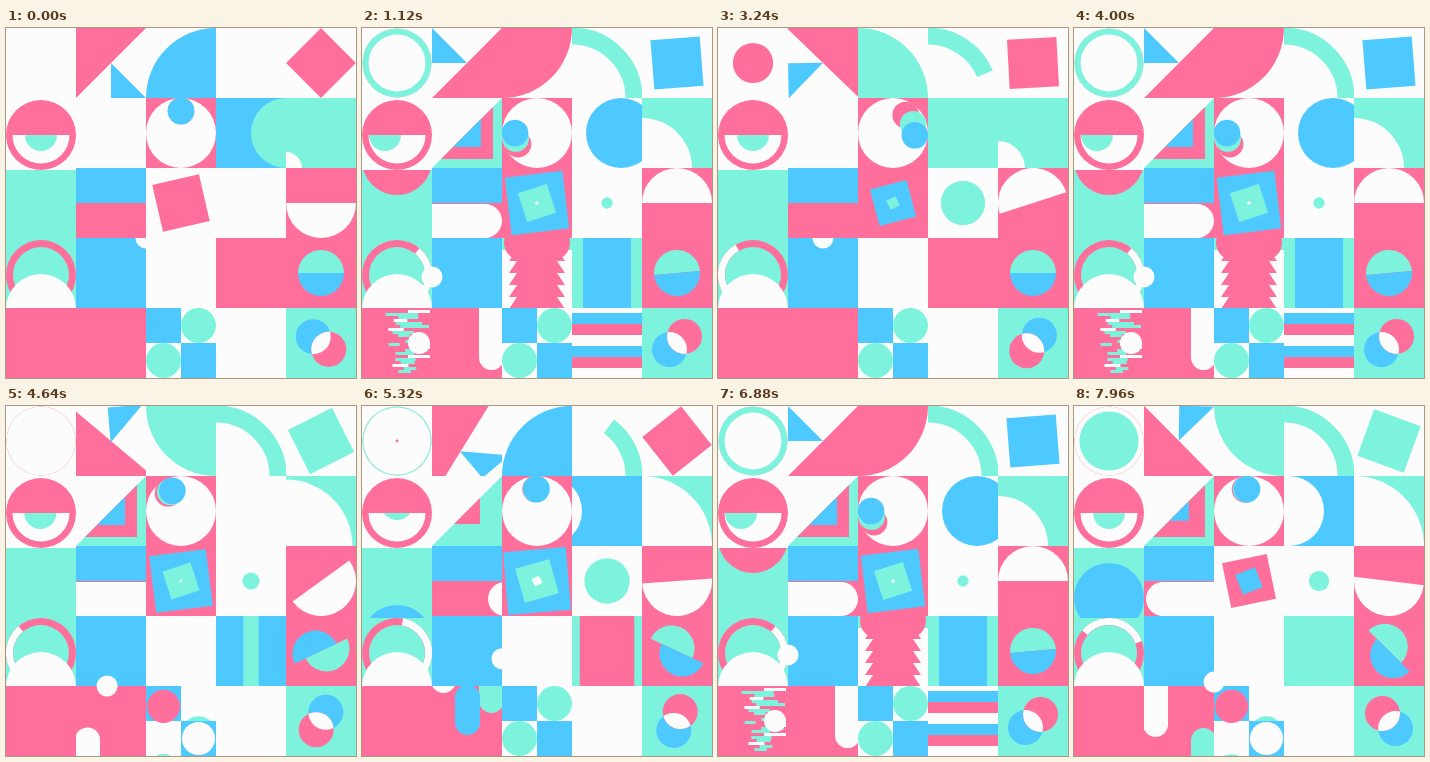
Animation of 350 by 350 pixels, one loop 8 s. Source, as an HTML page with a canvas:

```html
<!DOCTYPE html>
<html lang="en">
<head>
<meta charset="utf-8">
<title>Geometric tiles</title>
<style>
  html, body { margin: 0; width: 100%; height: 100%; overflow: hidden; background: #fcfcfc; }
  canvas { display: block; width: 350px; height: 350px; }
</style>
</head>
<body>
<canvas id="stage" width="350" height="350"></canvas>
<script>
const ctx = document.getElementById('stage').getContext('2d');
const PINK = '#ff6f9c', BLUE = '#4dc9ff', MINT = '#7df3dd', WHITE = '#fcfcfc';
const LOOP = 8000, CYCLE = 2880, BEAT = 720, STEP = 40, SIZE = 70, MID = 35;
const { PI, floor, min, max, sin, cos } = Math;
const rad = deg => deg * PI / 180;
const clamp = v => min(1, max(0, v));
const mix = (a, b, p) => a + (b - a) * p;
const noise = n => { const v = sin(n * 12.9898) * 43758.5453; return v - floor(v); };

// Cubic ease in and out
function ease(t, start, length = 420) {
  const p = clamp((t - start) / length);
  return p < .5 ? 4 * p ** 3 : 1 - 4 * (1 - p) ** 3;
}
// Straight interpolation through time, value pairs
function track(t, ...keys) {
  if (t <= keys[0]) return keys[1];
  for (let i = 2; i < keys.length; i += 2) {
    if (t <= keys[i]) return mix(keys[i - 1], keys[i + 1], (t - keys[i - 2]) / (keys[i] - keys[i - 2]));
  }
  return keys[keys.length - 1];
}
const burst = t => ease(t, 900, 180) * (1 - ease(t, 1180, 220));

function rect(color, x, y, w, h) {
  ctx.fillStyle = color;
  ctx.fillRect(x, y, w, h);
}
function disc(color, x, y, r, from = 0, to = 360) {
  if (r <= 0) return;
  ctx.fillStyle = color;
  ctx.beginPath();
  ctx.arc(x, y, r, rad(from), rad(to));
  ctx.fill();
}
function arc(color, x, y, r, width, from, to) {
  if (to <= from) return;
  ctx.strokeStyle = color;
  ctx.lineWidth = width;
  ctx.beginPath();
  ctx.arc(x, y, r, rad(from), rad(to));
  ctx.stroke();
}
function poly(color, ...points) {
  ctx.fillStyle = color;
  ctx.beginPath();
  for (let i = 0; i < points.length; i += 2) ctx.lineTo(points[i], points[i + 1]);
  ctx.fill();
}
function pill(color, x, y, w, h) {
  if (w <= 0 || h <= 0) return;
  ctx.fillStyle = color;
  ctx.beginPath();
  ctx.roundRect(x, y, w, h, min(w, h) / 2);
  ctx.fill();
}
function clipped(x, y, w, h, draw) {
  ctx.save();
  ctx.beginPath();
  ctx.rect(x, y, w, h);
  ctx.clip();
  draw();
  ctx.restore();
}
function turned(x, y, deg, draw) {
  ctx.save();
  ctx.translate(x, y);
  ctx.rotate(rad(deg));
  draw();
  ctx.restore();
}
function tile(col, row, back, draw, t, drop = 0) {
  ctx.save();
  ctx.translate(col * SIZE, row * SIZE + drop);
  clipped(0, 0, SIZE, SIZE, () => {
    rect(back, 0, 0, SIZE, SIZE);
    draw(t);
  });
  ctx.restore();
}

function ripples(t) {
  [[180, PINK], [420, WHITE], [660, MINT], [900, WHITE], [1125, PINK], [1360, WHITE],
   [1972, MINT], [2165, WHITE], [2365, PINK], [2520, WHITE]]
    .forEach(([start, color]) => disc(color, MID, MID, 34.5 * ease(t, start, 340)));
}

function triangles(t) {
  const beat = floor(t / BEAT), p = ease(t % BEAT, 0);
  turned(MID, MID, 225 + 90 * (beat + p), () => rect(PINK, 0, -60, 60, 120));
  const corners = [[52.5, 52.5], [17.5, 52.5], [17.5, 17.5], [52.5, 17.5]];
  const [a, b] = [corners[beat], corners[(beat + 1) % 4]];
  const spin = beat % 2 ? mix(90, 360, p) : 90 * p;
  turned(mix(a[0], b[0], p), mix(a[1], b[1], p), spin,
    () => poly(BLUE, -17.5, -17.5, -17.5, 17.5, 17.5, 17.5));
}

function quarter(t) {
  const states = [[BLUE, 70, 70], [MINT, 0, 70], [PINK, 0, 0], [MINT, 70, 0]];
  const beat = floor(t / BEAT), q = t % BEAT;
  const put = ([color, x, y], r) => disc(color, x, y, r);
  put(states[beat], track(q, 40, 70, 150, 0));
  put(states[(beat + 1) % 4], track(q, 150, 0, 270, 70));
}

function quarterRing(t) {
  arc(MINT, 0, SIZE, 62, 17, -90 + 90 * ease(t, 2160, 600), -90 + 90 * ease(t, 0, 600));
}

function spinningSquare(t) {
  const color = t < 380 || t > 2300 ? PINK : t < 1340 ? BLUE : MINT;
  const turn = track(t, 0, 45, 1120, 175.5, 2200, 290, 2440, 321.7, CYCLE, 405);
  turned(MID, MID, turn, () => rect(color, -24.7, -24.7, 49.4, 49.4));
}

function eye(t) {
  const x = MID - 12 * (ease(t, 720) - ease(t, 1440));
  const y = MID - 9 * (ease(t, 2160, 300) - ease(t, 2500, 340));
  disc(PINK, MID, MID, 35);
  disc(WHITE, MID, MID, 28.5, 0, 180);
  clipped(0, MID, SIZE, MID, () => disc(MINT, x, y, 16));
}

function nestedCorners(t) {
  const corner = (color, reach) => {
    const far = MID + reach, near = MID - reach;
    if (reach > 0) poly(color, far, near, far, far, near, far);
  };
  corner(MINT, 35 * (ease(t, 360) - ease(t, 2420, 440)));
  corner(PINK, 26 * (ease(t, 520) - ease(t, 2200, 480)));
  corner(BLUE, 14 * (ease(t, 680) - ease(t, 2040, 380)));
}

function moon(t) {
  disc(WHITE, MID, MID, 35);
  [[PINK, 180], [MINT, 90], [BLUE, 0]].forEach(([color, lag]) => {
    const rest = 1 - clamp((t - lag - 86) / 2794);
    const a = rad(270 + 360 * (1 - rest ** 3));
    disc(color, MID + 22 * cos(a), MID + 22 * sin(a), 13.3);
  });
}

function sweeps(t) {
  const sweep = (color, left) => pill(color, left, 0, 260, SIZE);
  if (t > 2500) sweep(MINT, track(t, 2560, 120, CYCLE, 35));
  if (t < 2100) {
    sweep(MINT, track(t, 0, 35, 300, -40));
    sweep(WHITE, track(t, 360, 75, 800, -40));
    sweep(PINK, track(t, 1080, 70, 1400, -40));
    if (t < 1400) disc(BLUE, track(t, 960, 106, 1120, 49, 1400, -36), MID, 35);
    sweep(WHITE, track(t, 1400, 75, 1760, -40));
    sweep(BLUE, 500);
  }
  if (t >= 1760) {
    if (t < 2500) rect(BLUE, 0, 0, SIZE, SIZE);
    const x = track(t, 2100, 36, 2200, 5, 2440, -25, 2600, -36);
    pill(WHITE, -100, 0, x + 135 + 90 * (1 - ease(t, 1900, 240)), SIZE);
  }
}

function growingQuarter(t) {
  const r = track(t, 0, 16, 1120, 50, 1900, 70);
  disc(WHITE, 0, SIZE, r);
  if (t > 2480) pill(MINT, track(t, 2480, 72, 2780, -40), 0, 200, SIZE);
  if (t > 2760) disc(WHITE, 0, SIZE, track(t, 2760, 0, CYCLE, 16));
}

function fallingDiscs(t) {
  [[955, PINK], [1820, BLUE]].forEach(([start, color]) => {
    const p = clamp((t - start) / 886);
    disc(color, MID, -70 + 178 * (1 - (1 - p) ** 2), 35);
  });
}

function slidingPill(t) {
  rect(BLUE, 0, 0, SIZE, MID);
  const left = t < 1500 ? -40 : track(t, 1800, -40, 2200, 2, 2440, 56, 2560, 70);
  const right = t < 1500 ? 70 * ease(t, 700) : 120;
  pill(WHITE, left, MID + 1, right - left, 34);
}

function squareTunnel(t) {
  const layers = [[BLUE, 0], [MINT, 158], [WHITE, 314], [PINK, 505]];
  [144, 789, 1434, 2080].forEach(base => layers.forEach(([color, delay]) => {
    const side = (t - base - delay) * .175;
    if (side <= 0) return;
    if (side >= SIZE) rect(color, 0, 0, SIZE, SIZE);
    else turned(MID, MID, -30 * (1 - side / 75), () => rect(color, -side / 2, -side / 2, side, side));
  }));
  // The square left over from the previous cycle
  const old = (t + 274) * .175;
  if (t < 144) turned(MID, MID, -13 * clamp((70 - old) / 22),
    () => rect(PINK, -old / 2, -old / 2, old, old));
}

function tunnelBack(t) {
  return t >= 126 && t < 500 ? PINK : WHITE;
}

function pulse(t) {
  const age = (t + 997) % 1027;
  if (age < 800) disc(MINT, MID, MID, 23 * sin(PI * age / 800));
}

function rockingHalf(t) {
  const turn = track(t, 0, 0, 400, 180, 520, 190, 740, 176, 960, 180, 1440, 180,
    1840, 360, 2000, 375, 2200, 367, 2440, 356, 2680, 362, CYCLE, 360);
  turned(MID, MID, turn, () => disc(WHITE, 0, 0, 35, 0, 180));
}

function dome(t) {
  disc(PINK, MID, MID, 35);
  const from = -300 + .25 * ((t + 1320) % 1440);
  arc(WHITE, MID, MID, 31.5, 7, from, min(from + 120, 60));
  disc(MINT, MID, MID, 28);
  disc(WHITE, MID, 69, 35);
}

function slicedDisc(t) {
  const p = burst(t);
  if (p <= 0) return;
  rect(MINT, 0, 0, SIZE, 12 * p);
  pill(PINK, 2, -12, 66, 24 * p + 10);
  for (let i = 0; i < 5; i++) {
    const y = 11 + 12 * i, narrow = 20 * p, wide = 28 * p;
    poly(PINK, MID - narrow, y, MID + narrow, y, MID + wide, y + 12, MID - wide, y + 12);
  }
}

function doors(t) {
  [[MINT, 440], [BLUE, 880], [MINT, 1600], [PINK, 2180]].forEach(([color, start]) => {
    const w = SIZE * ease(t, start);
    rect(color, MID - w / 2, 0, w, SIZE);
  });
}

function splitDisc(t) {
  const turn = track(t, 0, 0, 900, 0, 1120, -5, 1350, -45, 1900, -260, 2200, -315, 2440, -335, CYCLE, -360);
  const shift = track(t, 1120, 0, 1600, 6, 2440, 6, CYCLE, 0);
  turned(MID, MID, turn, () => {
    disc(MINT, -shift, 0, 23, 180, 360);
    disc(BLUE, shift, 0, 23, 0, 180);
  });
}

function slices(t) {
  const p = burst(t);
  if (p <= 0) return;
  for (let i = 0; i < 21; i++) {
    const x = 22 + 26 * noise(i + 1);
    rect(i % 3 ? MINT : WHITE, x, 2 + 3 * i, p * min(68 - x, 8 + 26 * noise(i + 40)), 3);
  }
  disc(WHITE, 57, 35, 11 * p);
}

function risers(t) {
  // Column, colour, time of leaving, length, speed
  [[2, WHITE, 1327, 80, .3], [0, WHITE, 2478, 90, .183],
   [2, MINT, 2530, 57, .3], [1, BLUE, 2603, 50, .3]].forEach(([col, color, end, length, speed]) => {
    pill(color, 24 * col - 1, (end - t) * speed - length, 25, length);
  });
}

function quads(t) {
  const away = ease(t, 1440) - ease(t, 2130, 300);
  const cell = (x, y, draw) => clipped(x, y, MID, MID, draw);
  rect(BLUE, 0, 0, MID, MID);
  rect(BLUE, MID, MID, MID, MID);
  cell(MID, 0, () => disc(MINT, 52.5, 17.5 + 32 * away, 17.5));
  cell(0, MID, () => disc(MINT, 17.5, 52.5 + 35 * away, 17.5));
  disc(PINK, 17.5, 17.5 + 3 * away, 17.5 * away);
  disc(WHITE, 52.5, 52.5, 17.5 * away);
}

function stripes(t) {
  const left = SIZE * ease(t, 1200, 360), right = SIZE * ease(t, 720, 360);
  [5, 38].forEach(y => {
    rect(BLUE, left, y, max(0, right - left), 11);
    rect(PINK, left, y + 11, max(0, right - left), 11);
  });
}

function overlap(t) {
  const a = rad(39 + .25 * t), x = 10 * cos(a), y = 10 * sin(a), r = 17.5;
  disc(BLUE, MID - x, MID - y, r);
  disc(PINK, MID + x, MID + y, r);
  ctx.save();
  ctx.beginPath();
  ctx.arc(MID - x, MID - y, r, 0, 2 * PI);
  ctx.clip();
  disc(WHITE, MID + x, MID + y, r);
  ctx.restore();
}

// White dot that runs anticlockwise along the edge of the blue tile
function runner(t) {
  const way = t / CYCLE * 4, side = floor(way), d = (way - side) * SIZE;
  const [x, y] = [[140 - d, 210], [70, 210 + d], [70 + d, 280], [140, 280 - d]][side];
  clipped(0, 210, 350, 140, () => disc(WHITE, x, y, 10.5));
}

function draw(t) {
  rect(WHITE, 0, 0, 350, 350);
  tile(0, 0, WHITE, ripples, t);
  tile(1, 0, WHITE, triangles, t);
  tile(2, 0, WHITE, quarter, t);
  tile(3, 0, WHITE, quarterRing, t);
  tile(4, 0, WHITE, spinningSquare, t);

  tile(0, 1, WHITE, eye, t, 2);
  tile(1, 1, WHITE, nestedCorners, t);
  tile(2, 1, PINK, moon, t);
  tile(3, 1, BLUE, sweeps, t);
  tile(4, 1, MINT, growingQuarter, t);

  tile(0, 2, MINT, fallingDiscs, t, 2);
  tile(1, 2, PINK, slidingPill, t);
  tile(2, 2, tunnelBack(t), squareTunnel, t);
  tile(3, 2, WHITE, pulse, t);
  tile(4, 2, PINK, rockingHalf, t);

  tile(0, 3, MINT, dome, t, 2);
  tile(1, 3, BLUE, () => {}, t);
  tile(2, 3, WHITE, slicedDisc, t);
  tile(3, 3, PINK, doors, t);
  tile(4, 3, PINK, splitDisc, t);

  tile(0, 4, PINK, slices, t);
  tile(1, 4, PINK, risers, t);
  tile(2, 4, WHITE, quads, t);
  tile(3, 4, WHITE, stripes, t);
  tile(4, 4, MINT, overlap, t);
  runner(t);
}

const began = performance.now();
function tick() {
  const now = (performance.now() - began) % LOOP;
  draw(floor(now / STEP) * STEP % CYCLE);
  requestAnimationFrame(tick);
}
tick();
</script>
</body>
</html>
```
